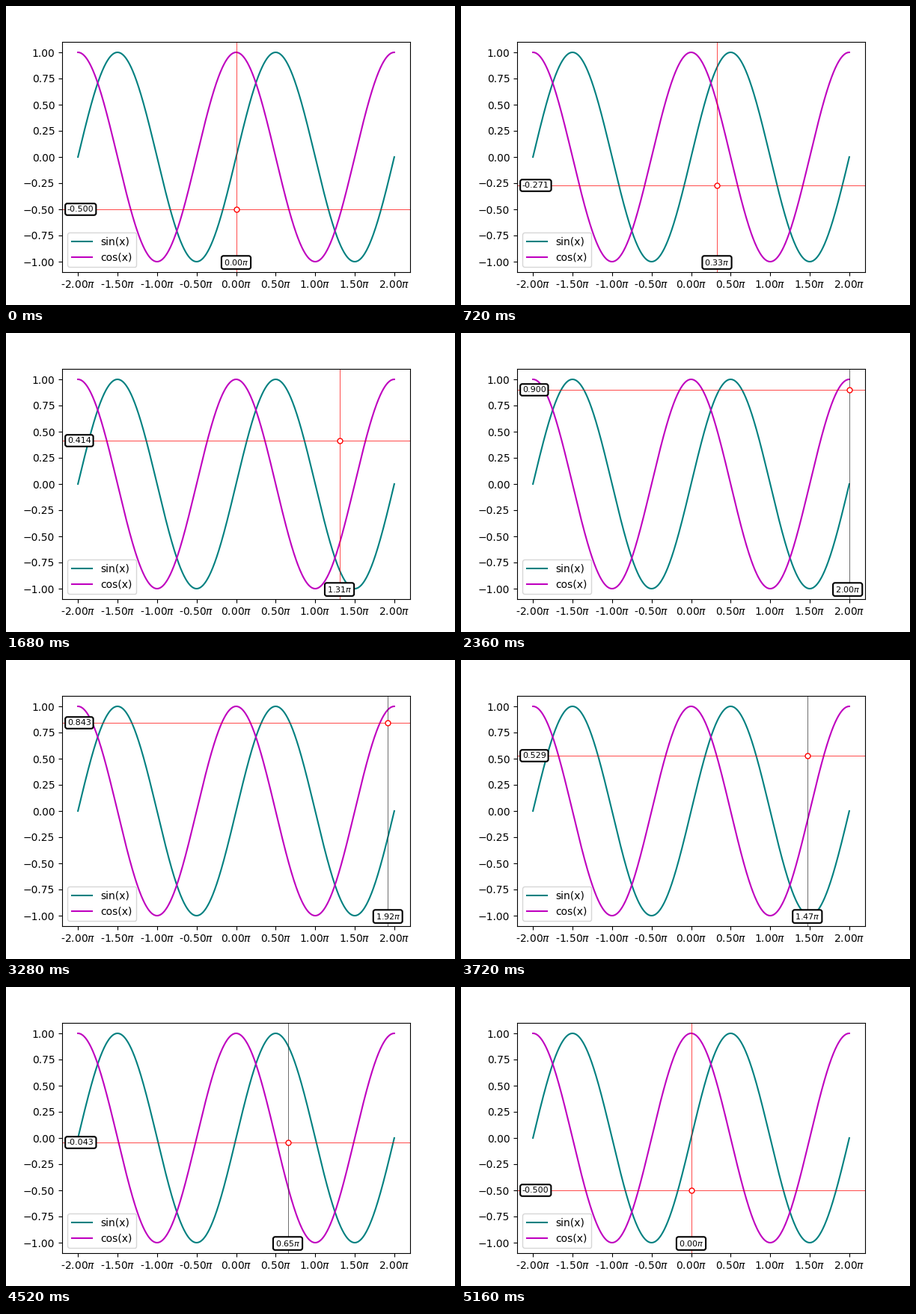
A matplotlib script that plays this animation: 600x400 px, repeating every 5.2 s.

```python
import matplotlib.pyplot as plt
import numpy as np
from matplotlib.animation import FuncAnimation
from matplotlib.ticker import FuncFormatter, MultipleLocator

INTERVAL = 40
FRAMES = 130
STEPS = 49                 # moves between the two end points
DEPART, RETURN = 10, 80    # frames at which each trip begins
START = np.array([0.0, -0.5])
END = np.array([2 * np.pi, 0.9])
INSET = 5                  # points between the axes edge and label text
RED, GREY = "r", "0.2"

plt.rcParams["font.family"] = "DejaVu Sans"


def pi_text(x, _=None):
    return rf"{x / np.pi:.2f}$\pi$"


def progress(frame):
    """Share of the way from START to END, held at both ends."""
    if frame < RETURN:
        step = min(max(frame - DEPART, 0), STEPS)
    else:
        step = max(STEPS - (frame - RETURN), 0)
    return step / STEPS


fig, ax = plt.subplots(figsize=(6, 4), dpi=100)
x = np.linspace(-2 * np.pi, 2 * np.pi, 1000)
ax.plot(x, np.sin(x), color="teal", label="sin(x)")
ax.plot(x, np.cos(x), color="m", label="cos(x)")
ax.xaxis.set_major_locator(MultipleLocator(np.pi / 2))
ax.xaxis.set_major_formatter(FuncFormatter(pi_text))
ax.set_xlim(-2.2 * np.pi, 2.2 * np.pi)
ax.set_ylim(-1.1, 1.1)
ax.legend(loc="lower left")

hline = ax.axhline(START[1], color=RED, lw=0.5)
vline = ax.axvline(START[0], color=RED, lw=0.5)
dot, = ax.plot(*START, "o", ms=5, mfc="w", mec=RED, mew=1, zorder=4)


def make_label(coords, offset, **align):
    return ax.annotate(
        "", xy=(0, 0), xycoords=coords, xytext=offset,
        textcoords="offset points", fontsize=8, zorder=6,
        bbox=dict(boxstyle="round,pad=0.25", fc="w", ec="k", lw=1.5), **align)


x_label = make_label(ax.get_xaxis_transform(), (0, INSET),
                     ha="center", va="bottom")
y_label = make_label(ax.get_yaxis_transform(), (INSET, 0),
                     ha="left", va="center")

# Rightmost centre that keeps the lower label inside the axes
right_px = ax.transAxes.transform((1, 0))[0] - INSET * fig.dpi / 72 - 16.4
x_max = ax.transData.inverted().transform((right_px, 0))[0]


def update(frame):
    px, py = START + (END - START) * progress(frame)
    returning = DEPART + STEPS <= frame < RETURN + STEPS
    hline.set_ydata([py, py])
    vline.set_xdata([px, px])
    vline.set_color(GREY if returning else RED)
    dot.set_data([px], [py])
    x_label.set_text(pi_text(px))
    x_label.xy = (min(px, x_max), 0)
    y_label.set_text(f"{py:.3f}")
    y_label.xy = (0, py)
    return hline, vline, dot, x_label, y_label


anim = FuncAnimation(fig, update, frames=FRAMES, interval=INTERVAL,
                     init_func=lambda: update(0), repeat=True, blit=False)
plt.show()
```
